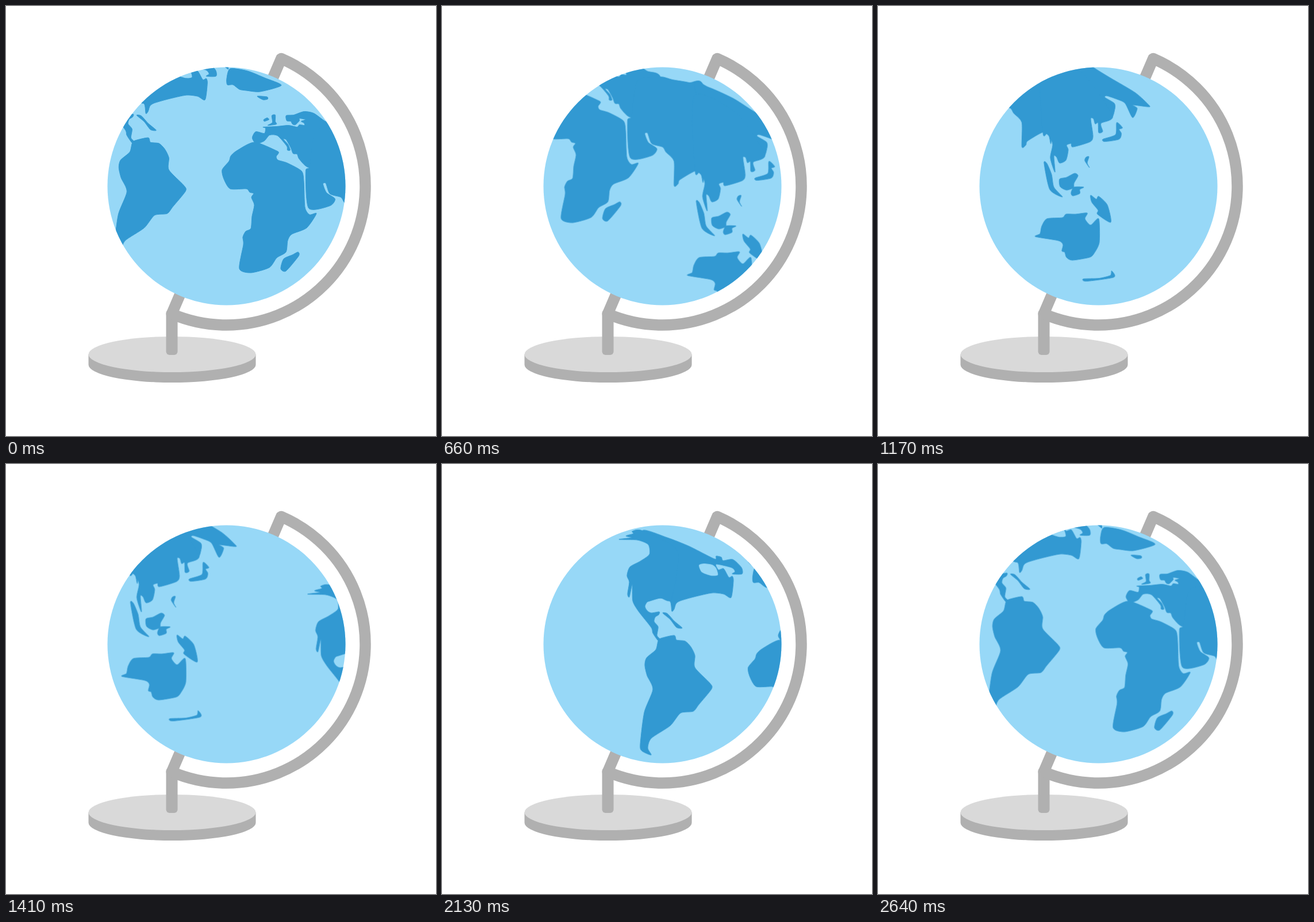
Animation, 748 px wide and 748 px high, one loop 2670 ms. Source, as an HTML page:

```html
<!DOCTYPE html>
<html lang="en">
<head>
<meta charset="utf-8">
<title>Spinning globe</title>
<style>
  html, body { margin: 0; width: 100%; height: 100%; overflow: hidden; background: #fff; }
  svg { display: block; width: 100%; height: 100%; }
  #map { fill: #3299d2; stroke: #3299d2; stroke-linejoin: round; }
  #map .sea { fill: #97d8f7; stroke: none; }
  .frame { fill: none; stroke: #b0b0b0; stroke-width: 19.5; stroke-linecap: round; stroke-linejoin: round; }
  /* one step every 30 ms */
  #world { animation: spin 2670ms steps(89) infinite; }
  @keyframes spin { to { transform: translate(-803.7px, -353.3px); } }
</style>
</head>
<body>
<svg viewBox="0 0 748 748">
  <defs>
    <clipPath id="disc"><circle cx="383.5" cy="313.5" r="207"/></clipPath>

    <g id="map">
      <!-- Americas -->
      <g transform="translate(-156.7 -68.9)">
        <polygon points="349,116 392,128 430,143 474,165 477,160 486,162 489,168 506,166 521,180 522,191 505,191 510,187 504,180 477,174 481,184 490,182 499,197 505,195 507,203 503,232 490,226 470,224 438,231 414,238 407,243 404,252 400,256 397,239 380,233 340,240 380,170"/>
        <polygon class="sea" points="447,176 456,173 470,175 477,181 480,193 468,194 452,188"/>
        <polygon points="308,131 330,128 320,125 333,121 331,117 349,116 410,150 400,234 380,233 360,237 353,247 357,255 364,259 378,257 377,262 371,266 369,274 376,283 374,298 379,304 376,307 367,294 364,284 342,256 332,238 331,209 326,231 323,226 326,205 322,194 327,179 345,169 361,157 359,140 340,132"/>
        <polygon points="384,259 392,260 404,273 418,285 408,284 397,270"/>
        <polygon points="376,308 381,303 404,298 408,306 423,308 433,318 440,333 440,354 466,381 469,391 447,418 437,430 415,433 397,455 364,477 358,494 364,506 348,499 345,488 352,432 367,392 357,368 353,350 356,337 372,323"/>
        <polygon points="533,170 542,172 543,179"/>
      </g>

      <!-- Greenland, Iceland, Africa, Madagascar -->
      <polygon points="390,109 420,113 450,125 479,138 442,149 418,147 406,145 395,137 385,137 384,126"/>
      <polygon points="437,157 454,158 455,162 447,163"/>
      <polygon points="432,237 401,252 391,261 388,270 376,285 379,301 390,318 418,318 424,324 431,326 427,333 432,346 428,366 426,387 417,392 412,402 413,415 406,457 426,464 458,455 471,438 487,428 490,408 497,397 523,386 540,361 528,363 520,350 518,305 514,287 489,273 473,268 470,262 474,256 471,252"/>
      <polygon points="508,428 509,435 487,461 478,457 483,440 498,433"/>

      <!-- Europe, Arabia, India -->
      <g transform="translate(108.4 47.6)">
        <polygon points="340,150 346,147 349,150 341,153"/>
        <polygon points="354,143 360,142 360,153 362,158 347,160 355,155"/>
        <polygon points="320,182 326,171 341,174 343,165 339,163 362,162 383,160 398,163 402,159 411,160 410,156 405,153 413,150 402,148 402,152 395,159 390,158 387,153 380,152 379,143 392,142 410,136 427,139 447,153 470,163 470,230 420,234 402,219 398,210 391,209 387,199 379,185 374,184 382,193 386,203 381,203 380,196 364,178 350,177 341,187 327,192"/>
        <polygon points="420,231 413,240 418,304 455,300 464,288 449,277 443,262 448,261 455,279 474,285 480,294 494,310 494,352 501,349 504,342 530,327 541,333 545,340 545,181 520,173 491,168 470,163 430,170"/>
      </g>

      <!-- East Asia, Indonesia, Australia -->
      <g transform="translate(280 123)">
        <polygon points="358,103 383,106 425,125 455,144 478,158 520,183 544,205 541,207 515,204 523,210 515,226 502,201 488,194 470,188 467,191 483,201 484,211 476,228 440,210 400,240"/>
        <polygon points="480,222 460,236 463,250 456,252 455,235 450,237 447,228 442,228 446,258 441,268 411,277 408,271 400,274 403,282 399,300 388,305 383,295 378,293 380,321 372,296 376,272 367,253 359,251 358,120 430,150"/>
        <polygon points="361,305 366,306 374,325 378,347 393,364 371,351"/>
        <polygon points="388,333 400,330 414,323 420,327 413,340 412,348 400,352 389,346"/>
        <polygon points="408,357 413,347 430,347 423,351 423,358 411,362"/>
        <polygon points="432,301 434,295 439,294 436,305 440,313"/>
        <polygon points="442,361 452,368 456,363 471,378 477,408 454,394 455,387 444,373"/>
        <polygon points="346,433 354,428 357,415 366,402 393,400 399,394 416,394 436,392 432,402 442,413 456,402 457,443 448,462 440,469 410,474 400,469 397,460 392,458 394,447 386,440"/>
      </g>

      <!-- Japan, New Zealand -->
      <g transform="translate(424.4 186.6)">
        <polygon points="319,200 341,192 343,171 353,180 347,183 351,190 347,200 322,204"/>
        <polygon points="285,443 312,442 332,437 334,429 338,440 290,447"/>
      </g>
    </g>
  </defs>

  <path fill="#b0b0b0" d="M143.5 606H434.5V624A145.5 31 0 0 1 143.5 624Z"/>
  <ellipse cx="289" cy="606" rx="145.5" ry="31" fill="#d9d9d9"/>
  <rect x="278.5" y="528" width="20" height="79" rx="6" fill="#b0b0b0"/>
  <path class="frame" d="M288.3 535.5L478.7 91.5A241.5 241.5 0 0 1 288.3 535.5"/>
  <circle cx="383.5" cy="313.5" r="207" fill="#97d8f7"/>
  <g clip-path="url(#disc)">
    <g id="world"></g>
  </g>
</svg>
<script>
  const NS = 'http://www.w3.org/2000/svg';
  const make = (tag, attrs) => {
    const el = document.createElementNS(NS, tag);
    for (const key in attrs) el.setAttribute(key, attrs[key]);
    return el;
  };

  // Closed curve through the points, softened at each corner.
  function smooth(pts, k = 0.12) {
    const at = i => pts[(i + pts.length) % pts.length];
    const ctrl = (i, dir) => at(i).map((v, a) => v + dir * k * (at(i + 1)[a] - at(i - 1)[a]));
    return 'M' + pts[0] + pts.map((_, i) =>
      'C' + [ctrl(i, 1), ctrl(i + 1, -1), at(i + 1)].join(' ')).join('') + 'Z';
  }

  for (const shape of document.querySelectorAll('#map polygon')) {
    const pts = shape.getAttribute('points').split(' ').map(p => p.split(',').map(Number));
    shape.replaceWith(make('path', { d: smooth(pts), class: shape.getAttribute('class') || '' }));
  }

  // The map repeats once per turn.
  const world = document.getElementById('world');
  for (const turn of [0, 1]) {
    world.append(make('use', { href: '#map', x: turn * 797.7, y: turn * 350.9 }));
  }
</script>
</body>
</html>
```
